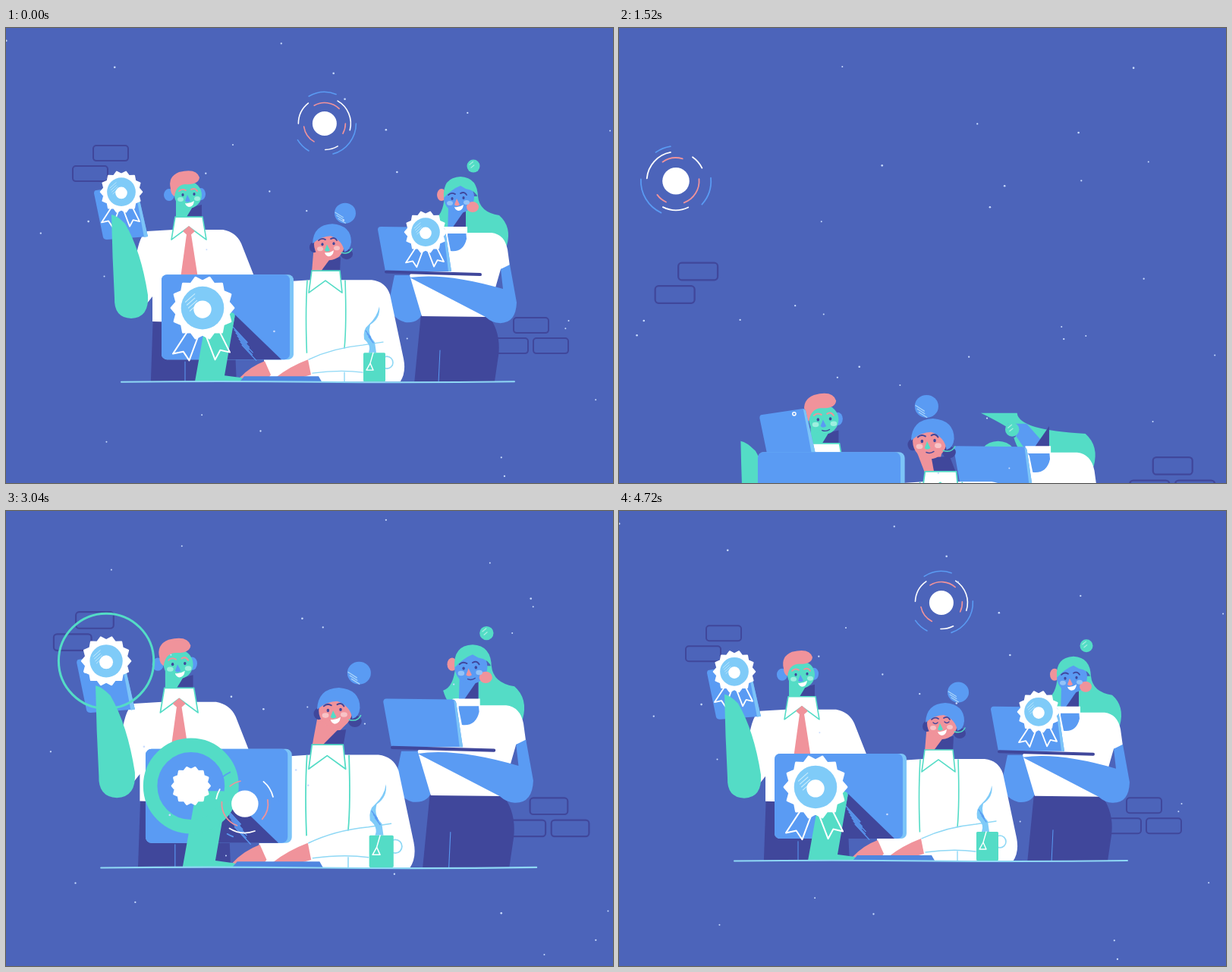
Animation of 800 by 600 pixels, one loop 4760 ms. Source, as an HTML page with a canvas:

```html
<!DOCTYPE html>
<html lang="en">
<head>
<meta charset="utf-8">
<title>Team and badges</title>
<style>
html, body { margin: 0; width: 100%; height: 100%; overflow: hidden; background: #4c64ba; }
canvas { display: block; }
</style>
</head>
<body>
<canvas id="stage" width="800" height="600"></canvas>
<script>
const c = document.getElementById('stage').getContext('2d');
const LOOP = 4760, TAU = Math.PI * 2;
const BG = '#4c64ba', NAVY = '#40479b', BLUE = '#5a9bf3', SKY = '#7fcbf8', GREEN = '#54dcc6',
  PINK = '#f0939b', WHITE = '#fff', LINE = '#8fd8f5', EDGE = '#7cc4f8';

// ---------- timing ----------
const clamp = u => Math.max(0, Math.min(1, u));
const inOut = u => u < .5 ? 4 * u ** 3 : 1 - 4 * (1 - u) ** 3;
const backOut = u => 1 + 2.7 * (u - 1) ** 3 + 1.7 * (u - 1) ** 2;
const bump = (t, center, width) => Math.exp(-(((t - center) / width) ** 2));
const random = n => {
  const v = Math.sin(n * 12.9898) * 43758.5453;
  return v - Math.floor(v);
};

// Smooth cyclic curve through [time, value, ...] points.
function curve(points, column = 1) {
  const n = points.length;
  const at = i => {
    const turn = Math.floor(i / n), p = points[i - turn * n];
    return [p[0] + turn * LOOP, p[column]];
  };
  const slope = i => (at(i + 1)[1] - at(i - 1)[1]) / (at(i + 1)[0] - at(i - 1)[0]);
  return t => {
    let i = n - 1;
    while (i > 0 && points[i][0] > t) i--;
    const [t0, a] = at(i), [t1, b] = at(i + 1), d = t1 - t0, u = (t - t0) / d;
    return a + (b - a) * u * u * (3 - 2 * u) + d * (slope(i) * u * (1 - u) ** 2 - slope(i + 1) * u * u * (1 - u));
  };
}
const flight = [[0, 420, 126], [920, 290, 150], [1880, -30, 215], [2360, 41, 117], [2732, 137, 193],
  [3040, 314, 386], [3230, 556, 258], [3880, 507, 119], [4720, 425, 121]];
const logoX = curve(flight), logoY = curve(flight, 2);
const zoomAt = curve([[0, 1], [920, 1.027], [1880, 1.17], [2360, 1.228], [3040, 1.108], [3880, 1.01], [4720, 1]]);
const headX = curve([[0, 0], [1880, -20], [2360, -11], [3040, 5], [3880, -18], [4720, 0]]);
const headY = t => -7 * bump(t, 2700, 800);

// Camera tilt up to the empty sky and back.
function panAt(t) {
  const d = (t + LOOP - 4510) % LOOP;
  return 560 * (d < 1406 ? inOut(d / 1406) : 1 - inOut(clamp((d - 1406) / 700)));
}

// ---------- drawing helpers ----------
function shape(path, fill, stroke, width = 1.6) {
  const p = new Path2D(path);
  if (fill) { c.fillStyle = fill; c.fill(p); }
  if (stroke) { c.strokeStyle = stroke; c.lineWidth = width; c.stroke(p); }
}
function oval(x, y, rx, fill, ry = rx) {
  c.beginPath();
  c.ellipse(x, y, rx, ry, 0, 0, TAU);
  c.fillStyle = fill;
  c.fill();
}
function arc(x, y, r, stroke, width, from = 0, to = TAU) {
  c.beginPath();
  c.arc(x, y, r, from, to);
  c.strokeStyle = stroke;
  c.lineWidth = width;
  c.stroke();
}
function box(x, y, w, h, r, fill, stroke) {
  c.beginPath();
  c.roundRect(x, y, w, h, r);
  if (fill) { c.fillStyle = fill; c.fill(); }
  if (stroke) { c.strokeStyle = stroke; c.lineWidth = 2; c.stroke(); }
}
function at(x, y, scale, draw) {
  c.save();
  c.translate(x, y);
  c.scale(scale, scale);
  draw();
  c.restore();
}
// Short parallel brush strokes; (dx, dy) is the longest one.
function scratch(x, y, dx, dy, count, color) {
  for (let i = 0; i < count; i++) {
    const k = .4 + .6 * random(i + 3);
    shape(`M${x + i * 2} ${y + i * 4}l${dx * k} ${dy * k}`, null, color, 1.2);
  }
}
// Parallax layer: depth 1 is the desk, smaller is farther back.
function layer(zoom, pan, depth, panDepth, draw) {
  const k = 1 + (zoom - 1) * depth;
  c.save();
  c.translate(400, 300 + pan * panDepth);
  c.scale(k, k);
  c.translate(-400, -300 - 12.6 * panDepth);
  draw();
  c.restore();
}

function face(x, y, nose, brow, cheek, smiling, closed) {
  at(x, y, 1, () => {
    shape('M-12 -6Q-8 -10 -3 -7M4 -8Q9 -11 12 -6', null, brow, 1.8);
    if (closed) shape('M-10 -2Q-7 1 -4 -2M5 -3Q8 0 11 -3', null, NAVY, 1.4);
    else { oval(-7, -1, 1.6, NAVY, 2); oval(8, -2, 1.6, NAVY, 2); }
    oval(-10, 5, 4, cheek, 3);
    oval(12, 4, 4, cheek, 3);
    shape('M-1 -1L3 7Q-1 10 -4 7Z', nose);
    if (smiling) shape('M-4 10Q2 11 8 7Q7 15 1 15Q-3 14 -4 10Z', WHITE);
    else shape('M-2 12Q3 14 7 11', null, NAVY, 1.3);
  });
}

function badge(x, y, r, start, t) {
  const age = t < 1150 ? LOOP : t - start;
  if (age <= 0) return;
  const grow = delay => age > delay ? Math.max(0, backOut(clamp((age - delay) / 400))) : 0;
  at(x, y, r / 40, () => {
    const tail = clamp((age - 220) / 250);
    c.save();
    c.scale(1, tail);
    if (tail) shape('M-21 33L-40 62L-26 59L-18 71L-5 36M4 36L17 70L24 57L37 60L22 30', null, WHITE, 96 / (r + 8));
    c.restore();
    const star = grow(50);
    c.beginPath();
    for (let i = 0; i < 28; i++) {
      const a = i * TAU / 28, q = star * (i % 2 ? 36 : 42);
      c.lineTo(q * Math.cos(a), q * Math.sin(a));
    }
    c.closePath();
    c.fillStyle = c.strokeStyle = WHITE;
    c.lineWidth = 3;
    if (star) { c.fill(); c.stroke(); }
    at(0, 0, grow(130), () => {
      oval(0, 0, 29, SKY);
      scratch(-23, -8, 17, -15, 4, '#c9ecfc');
      oval(0, 2, 12, WHITE);
    });
  });
  const u = age / 350;
  if (u < 1) arc(x, y, 58 * (1 - (1 - u) ** 5), GREEN, 24 * (1 - u));
}

// ---------- scene parts ----------
function bricks() {
  for (const [x, y] of [[115, 155], [88, 182], [669, 382], [642, 409], [695, 409]])
    box(x, y, 46, 20, 4, null, NAVY);
}

function man(t, sink, happy) {
  shape('M194 375L189 520H306L300 375Z', NAVY);
  shape('M236 440V470', null, BLUE, 1);
  shape('M186 268L220 266H286Q303 269 310 284L334 345L300 390L193 387V354L182 368L171 304Q176 272 186 268Z', WHITE);
  shape('M224 222V254H237L246 236Z', GREEN);
  shape('M235 254L246 236L258 233V254Z', NAVY);
  shape('M238 272H244L253 330H230Z', PINK);
  shape('M223 249H259L264 279L241 262L218 279Z', WHITE, GREEN);
  shape('M241 261L249 268L241 275L233 268Z', PINK);
  oval(215, 220, 7, BLUE, 8);
  oval(257, 219, 6, BLUE, 8);
  oval(240, 220, 18, GREEN, 18);
  shape('M217 212Q213 196 228 190Q251 184 255 197Q254 207 236 206Q224 207 222 222Q217 219 217 212Z', PINK);
  face(240, 221, BLUE, PINK, '#9defdf', happy);
  c.save();
  c.translate(46 * sink, 0);
  shape('M119 214L167 207Q171 206 172 209L187 275L133 279Q129 279 128 276L116 218Q116 214 119 214Z', BLUE);
  shape('M169 207L172 209L187 275L182 276Z', EDGE);
  if (t > 1150 && t < 2800) arc(158, 213, 2, WHITE, 1.3);
  badge(152, 216, 26, 2732, t);
  c.restore();
  shape('M139 246Q146 247 157 258Q178 294 187 352Q189 382 165 383Q142 382 143 356Q140 300 139 246Z', GREEN);
}

function rightWoman(t, sink, happy) {
  const hx = -55 * sink;
  shape('M547 377H634Q653 400 649 432L636 520H533Z', NAVY);
  shape('M572 425L570 468', null, BLUE, 1);
  shape('M512 326H540L550 372Q546 390 526 388Q505 382 505 360Z', BLUE);
  shape(`M${578 + hx} 222Q576 248 563 252Q570 275 582 272L660 287Q667 262 650 247Q${624 + hx} 243 ${622 + hx} 222Z`, GREEN);
  shape('M575 262H608V270H640Q657 272 661 292L664 314L652 318L634 381L548 380L532 326Z', WHITE);
  shape(`M${583 + hx / 2} 235H${606 + hx / 2}L606 266L607 278Q603 296 586 294L582 274Z`, BLUE);
  shape('M588 264L606 238V264Z', NAVY);
  shape('M577 262H607V271H577Z', WHITE);
  c.save();
  c.translate(hx, 60 * sink * sink);
  oval(574, 220, 6, PINK, 8);
  oval(597, 223, 20, BLUE, 21);
  shape('M577 224Q575 197 599 196Q622 197 622 224Q619 214 606 212L599 208Q588 212 577 224Z', GREEN);
  oval(615, 236, 8, PINK, 7);
  oval(616, 182, 8.5, GREEN);
  scratch(611, 180, 6, -5, 2, '#a9efe2');
  face(595, 226, PINK, NAVY, '#93c3f8', happy);
  c.restore();
  shape('M664 312L673 362Q672 390 650 389Q641 389 632 381L532 329Q580 322 655 344L652 318Z', BLUE);
  shape('M494 262L574 263Q578 263 579 267L587 321H500L490 266Q490 262 494 262Z', BLUE);
  shape('M576 263L579 267L587 321H583Z', EDGE);
  shape('M501 321.5L625 325', null, NAVY, 4);
  badge(553, 269, 26, 3230, t);
}

function midWoman(t, calm, happy, closed) {
  const hx = headX(t), hy = headY(t), elbow = 12 * calm;
  shape(`M370 334L401 332H482Q500 334 506 351L${524 + elbow} 436Q${530 + elbow} 466 ${504 + elbow} 480H340V420H372Z`, WHITE);
  shape('M397 333Q394 380 397 440M447 333Q449 390 446 422', null, GREEN);
  shape(`M${406 + hx} ${285 + hy}L403 322H418L${440 + hx} ${300 + hy}Z`, PINK);
  shape(`M414 322L${428 + hx} 303L${441 + hx / 2} 302L440 322Z`, NAVY);
  shape('M403 320H440L443 349L421 333L399 349Z', WHITE, GREEN);
  c.save();
  c.translate(hx, hy);
  oval(449, 298, 8, NAVY, 7);
  oval(406, 289, 6, NAVY, 7);
  oval(426, 285, 20, PINK, 21);
  shape('M404 284Q405 259 430 258Q455 260 455 282Q454 293 446 295Q444 280 428 274Q416 274 404 284Z', BLUE);
  shape('M442 296Q452 299 456 291', null, GREEN, 1.4);
  face(424, 286, GREEN, NAVY, '#f8c3c6', happy, closed);
  c.restore();
  c.save();
  c.translate(2.4 * hx, 1.6 * hy);
  oval(447, 244, 14, BLUE, 13.5);
  scratch(434, 243, 14, 9, 3, '#a9d4fa');
  c.restore();
}

function desk(t, calm) {
  const reach = 14 * calm;
  shape(`M342 439L399 428L468 420Q500 414 506 440L${500 + reach} 466H330Z`, WHITE);
  shape(`M${399 + reach} 437Q430 422 470 418L497 414M${404 + reach} 455Q440 450 470 454M446 454V466`, null, LINE, 1.4);
  shape('M308 461Q322 446 341 439L349 457L344 463H312Z', PINK);
  c.save();
  c.translate(reach, 0);
  shape('M355 461Q374 446 398 437L402 457L384 462Z', PINK);
  c.restore();
  box(205, 325, 174, 112, 7, EDGE);
  box(205, 325, 169, 112, 7, BLUE);
  shape('M302 378L363 437H290Z', NAVY);
  scratch(299, 394, 26, 28, 7, BLUE);
  shape('M271 375H297Q303 375 301 383L288 458L311 461L313 466H249L264 382Q265 375 271 375Z', GREEN);
  badge(259, 369, 39, 2935, t);
  shape('M314 459H412L416 466H308Z', '#4f86e0');
  const tip = 492 + 3 * Math.sin(t / LOOP * TAU * 4);
  shape(`M${tip} 367Q${tip + 2} 382 480 391Q476 404 486 414L488 428H478Q482 418 472 410Q470 397 478 391Q489 381 ${tip} 367Z`, SKY);
  scratch(474, 399, 9, 12, 3, BLUE);
  arc(502, 441, 8, LINE, 1.6);
  box(471, 428, 29, 38, 1.5, GREEN);
  shape('M484 428L480 442L475 451H484L480 442', null, WHITE, 1.4);
  shape('M152 466.5Q280 465 411 466.5T670 466', null, LINE, 2);
}

function logo(t, zoom) {
  const spin = t / LOOP * TAU;
  const amount = 1 - .85 * bump(t, 920, 350) - .4 * bump(t, 3040, 250);
  at(logoX(t), logoY(t), zoom, () => {
    oval(0, 0, 16, WHITE);
    [PINK, WHITE, BLUE].forEach((color, ring) => {
      const part = clamp((amount - .25 * ring) * 2);
      for (let i = 0; i < 3 && part; i++) {
        const from = (i + .5 * ring) * TAU / 3 + spin * (ring % 2 ? -1 : 1);
        arc(0, 0, 27.5 + 7 * ring, color, 1.6, from, from + part * (.5 + .4 * i));
      }
    });
  });
}

function stars(t) {
  const sky = Math.floor(t / 320) % 7;
  for (let i = 0; i < 28; i++) {
    const seed = sky * 100 + i + 1;
    oval(800 * random(seed), 600 * random(seed + .5), 1 + i % 3 * .15, '#c9dcff');
  }
}

// ---------- frame ----------
function draw(t) {
  const zoom = zoomAt(t), pan = panAt(t), arriving = t > 1150;
  const sink = arriving ? (1 - clamp((t - 1650) / 1100)) ** 3 : 0;
  const calm = arriving ? 1 - inOut(clamp((t - 2450) / 500)) : 0;
  const happyFrom = start => !arriving || t > start;
  const closed = t > 4640 && t < 4750 || t > 1780 && t < 1960;
  const sunk = (x, y, part) => {
    c.save();
    c.translate(x * sink, y * sink);
    part();
    c.restore();
  };
  c.fillStyle = BG;
  c.fillRect(0, 0, 800, 600);
  c.lineCap = c.lineJoin = 'round';
  layer(zoom, pan, .745 + .4 * sink, .75, bricks);

  c.save();
  c.beginPath();
  c.rect(0, -200, 800, 500 + 153.6 * zoom + pan);
  c.clip();
  layer(zoom, pan, .745, .84, () => {
    sunk(40, 100, () => man(t, sink, happyFrom(2700)));
    sunk(-52, 90, () => rightWoman(t, sink, happyFrom(3250)));
  });
  layer(zoom, pan, 1, 1, () => sunk(0, 28, () => midWoman(t, calm, happyFrom(2900), closed)));
  c.restore();

  layer(zoom, pan, 1, 1, () => desk(t, calm));
  logo(t, zoom);
  stars(t);
}

function tick() {
  draw(performance.now() % LOOP);
  requestAnimationFrame(tick);
}
tick();
</script>
</body>
</html>
```
